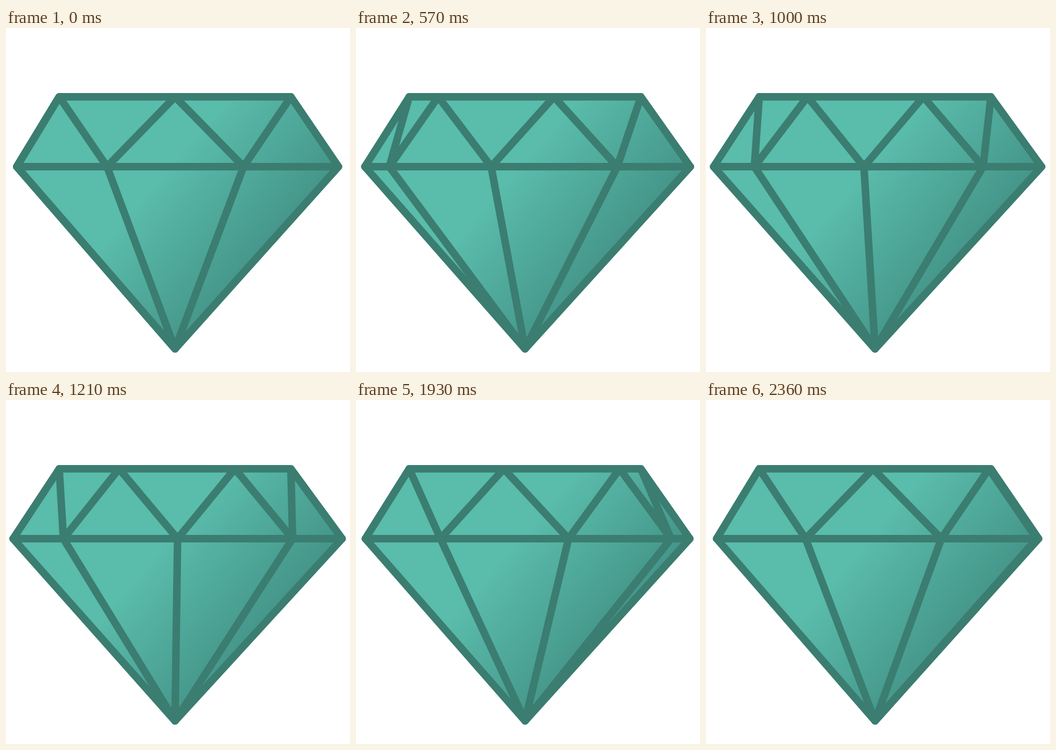
An HTML page that plays this animation: 640x640 px, repeating every 2.43 s.

```html
<!DOCTYPE html>
<html lang="en">
<head>
<meta charset="utf-8">
<title>Turning gem</title>
<style>
  html, body { margin: 0; width: 100%; height: 100%; overflow: hidden; background: #fff; }
  svg { display: block; width: 100%; height: 100%; }
  path { stroke: #3b7d71; stroke-width: 14; stroke-linejoin: round; stroke-linecap: round; }
</style>
</head>
<body>
<svg viewBox="0 0 640 640">
  <defs>
    <linearGradient id="shade" gradientUnits="userSpaceOnUse" x1="270" y1="298" x2="448" y2="449">
      <stop offset="0" stop-color="#5abcab"/>
      <stop offset="1" stop-color="#45978a"/>
    </linearGradient>
  </defs>
  <path id="body" fill="url(#shade)"/>
  <path id="facets" fill="none"/>
</svg>
<script>
  const LOOP = 2430, STEPS = 60, STEP_MS = 40, FPS = 14;
  const TOP = 128, GIRDLE = 258, TIP = [314.5, 597];
  const LEFT = 99, RIGHT = 530;
  const body = document.getElementById('body');
  const facets = document.getElementById('facets');

  const mix = (a, b, p) => a + (b - a) * p;
  const line = (...pts) => 'M' + pts.map(q => q[0].toFixed(2) + ' ' + q[1]).join('L');

  // Picture holds at 14 fps; the turn itself advances in 40 ms steps.
  function progress(ms) {
    const tick = Math.floor((ms % LOOP) / 10);
    const shot = Math.floor((tick + 0.5) * FPS / 100);
    const shown = 10 * Math.round(shot * 100 / FPS);
    return Math.ceil(shown / STEP_MS) / STEPS;
  }

  function draw(ms) {
    const p = progress(ms);
    const bulge = 7 * (1 - Math.abs(2 * p - 1));
    const west = [20 - bulge, GIRDLE], east = [618.5 + bulge, GIRDLE];
    const nw = [LEFT, TOP], ne = [RIGHT, TOP];
    const crown = [[mix(LEFT, 314.5, p), TOP], [mix(314.5, RIGHT, p), TOP]];
    const belt = [[20, 188], [188, 442], [442, 618.5]].map(([a, b]) => [mix(a, b, p), GIRDLE]);

    body.setAttribute('d', line(nw, ne, east, TIP, west) + 'Z');
    facets.setAttribute('d',
      line(west, east) +
      line(nw, belt[0], crown[0], belt[1], crown[1], belt[2], ne) +
      belt.map(b => line(b, TIP)).join(''));
  }

  function tick(now) {
    draw(now);
    requestAnimationFrame(tick);
  }
  draw(0);
  requestAnimationFrame(tick);
</script>
</body>
</html>
```
